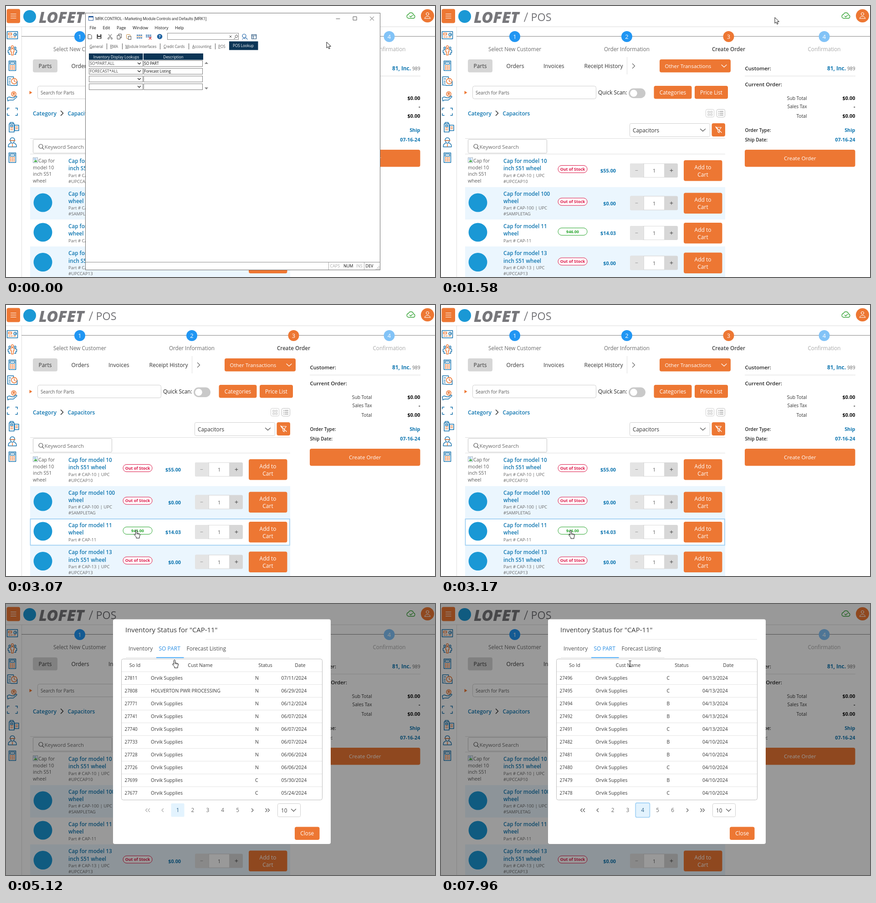
Recreate the animation shown at these times as an HTML page. Size 942 by 594 pixels, loop 8 s.

```html
<!DOCTYPE html>
<html lang="en">
<head>
<meta charset="utf-8">
<title>POS inventory lookup</title>
<style>
html, body { margin: 0; width: 100%; height: 100%; overflow: hidden; background: #fff; }
svg { display: block; width: 942px; height: 594px; font-family: "Open Sans", "Noto Sans", sans-serif; }
text { white-space: pre; }
.b, .o, .l { fill: none; stroke: #1b75ae; stroke-width: 1.5; stroke-linejoin: round; stroke-linecap: round; }
.o { stroke: #ed7733; }
.l { stroke: #333; stroke-width: 1.2; }
.win { transform-origin: 498px 594px; animation: minimise 8s infinite; }
.mask { animation: mask 8s infinite; }
.modal { transform-origin: 474px 165px; animation: pop 8s infinite; }
.cur { animation: move 8s ease-in-out infinite; }
@keyframes minimise {
  0%, 15.25% { opacity: 1; transform: none; animation-timing-function: ease-in; }
  18%, 100% { opacity: 0; transform: translateY(60px) scale(.75); }
}
@keyframes mask { 0%, 41.3% { opacity: 0 } 43.6%, 100% { opacity: 1 } }
@keyframes pop {
  0%, 41.3% { opacity: 0; transform: scale(.7) }
  43.6%, 100% { opacity: 1; transform: none }
}
@keyframes move {
  0%, 1.1% { transform: translate(704px, 79px) }
  5.6%, 20% { transform: translate(733px, 25px); animation-timing-function: ease-in }
  24.3% { transform: translate(654px, 75px); animation-timing-function: ease-out }
  33.6%, 38.4% { transform: translate(286px, 493px) }
  39.5%, 49% { transform: translate(285px, 494px) }
  58%, 62.9% { transform: translate(352px, 102px) }
  64% { transform: translate(370px, 122px) }
  70%, 79% { transform: translate(410px, 454px) }
  80.7%, 82% { transform: translate(442px, 458px) }
  84.4%, 94% { transform: translate(476px, 460px) }
  99.5%, 100% { transform: translate(415px, 131px) }
}
</style>
</head>
<body>
<script>
const ORANGE = '#ed7733', LINK = '#0f76b0', NAVY = '#0c3556', LOGO = '#1a98d5', INK = '#444', DARK = '#383838';
let css = '';
let layers = 0;

const t = (x, y, s, size = 12, fill = INK, weight = 400, anchor = 'start', extra = '') =>
  `<text x="${x}" y="${y}" font-size="${size}" fill="${fill}" font-weight="${weight}" text-anchor="${anchor}" ${extra}>${s}</text>`;
const mid = (x, y, s, size, fill, weight) => t(x, y, s, size, fill, weight, 'middle');
const end = (x, y, s, size, fill, weight) => t(x, y, s, size, fill, weight, 'end');
const r = (x, y, w, h, fill, rx = 0, stroke = 'none', extra = '') =>
  `<rect x="${x}" y="${y}" width="${w}" height="${h}" fill="${fill}" rx="${rx}" stroke="${stroke}" ${extra}/>`;
const box = (x, y, w, h, stroke, rx = 0, fill = '#fff') => r(x + .5, y + .5, w - 1, h - 1, fill, rx, stroke);
const c = (x, y, rad, fill) => `<circle cx="${x}" cy="${y}" r="${rad}" fill="${fill}"/>`;
const p = (d, cls = 'l', extra = '') => `<path d="${d}" class="${cls}" ${extra}/>`;
const h = (x1, x2, y, col = '#dedede') => r(x1, y, x2 - x1, 1, col);
const at = (x, y, s) => `<g transform="translate(${x} ${y})">${s}</g>`;
const white = 'style="stroke:#fff"';

// Shows its content only within the given [start, stop] spans in ms.
function during(spans, content) {
  const name = 'on' + layers++;
  let steps = '0%{opacity:0}';
  for (const [a, b] of spans) steps += `${a / 80}%{opacity:1}` + (b < 8000 ? `${b / 80}%{opacity:0}` : '');
  css += `@keyframes ${name}{${steps}}`;
  return `<g style="animation:${name} 8s step-end infinite">${content}</g>`;
}

const button = (x, y, w, ht, label, size = 11.8) =>
  r(x, y, w, ht, ORANGE, 4) + mid(x + w / 2, y + ht / 2 + 4.5, label, size, '#fff');

// --- Page ---
function header() {
  let s = h(0, 942, 45, '#dcdcdc') + r(34, 46, 1, 548, '#dedede');
  s += r(1.5, 6.5, 29.5, 31, ORANGE, 4) + p('M10.5 17.5h11.5M10.5 22h11.5M10.5 26.5h11.5', 'l', white);
  s += c(52, 23, 14, LOGO);
  s += t(72, 36.5, 'LOFET', 34, '#77777b', 800, 'start', 'font-style="italic"');
  s += p('M183 34L190 15', 'l', 'style="stroke:#77777b;stroke-width:1.8"') + t(197.5, 32.5, 'POS', 23.3, '#707074');
  s += p('M884 27h10a3.8 3.8 0 0 0 .8-7.5 5.7 5.7 0 0 0-11-1 4.3 4.3 0 0 0 .2 8.5zM886.5 22l2.2 2.2 4-4', 'l', 'style="stroke:#3aa53a;stroke-width:1.4"');
  s += c(925.5, 21.5, 14.5, ORANGE) + p('M925.5 14.5a3 3 0 1 0 .01 0zM919.5 27.5c0-6 12-6 12 0z', 'l', white);
  return s;
}

function sidebar() {
  const calc = p('M-7.5-10.5h15v21h-15zM-5-8h10v4.5h-10z', 'b') +
    p('M-5 0h10M-5 3.5h10M-5 7h10', 'o', 'stroke-dasharray="2.4 1.4" style="stroke-width:2.4;stroke-linecap:butt"');
  const person = 'M0-10.5a2.5 2.5 0 1 0 .01 0zM-3.5 0v-2.5q3.5-3 7 0V3h-1.5v7h-4V3h-1.5z';
  const icons = [
    p('M-11.5-8h23v16h-23z', 'b') + p('M-8.5-4.5h7v4h-7zM-8 4h3m2 0h3m3 0h4', 'o') + p('M6-4.5a3 3 0 1 0 .01 0zM6-1.5h3', 'b'),
    p('M-6-7.5a2 2 0 1 0 .01 0zM6-7.5a2 2 0 1 0 .01 0zM-9.5-.5v5h2v4h3M9.5-.5v5h-2v4h-3M-9.5-.5q2-2 4-1M9.5-.5q-2-2-4-1', 'b') + p(person, 'o'),
    calc,
    p('M-10.5-9.5h13v4M-10.5-9.5v18h7M-7.5-5h4M-7.5 0h3M-7.5 4h3', 'b') + p('M4-6a6 6 0 1 0 .01 0zM4-3.5v3.5l2.5 1.5', 'o') + p('M-3 9.5h13.5v-9', 'b'),
    p('M-11 3l4-2 6 2h4l5-4q3 1 1 3L2 8h-8l-4 2z', 'b') + p('M3-10.5a5 5 0 1 0 .01 0zM5-7.5q-4-1-4 1l4 1q0 2-4 1', 'o'),
    p('M-11-4v-4h4M7-8h4v4M11 4v4h-4M-7 8h-4v-4', 'b'),
    at(2, 0, p('M-9-7h11v18h-11zM-7-7v-3h7v3M-6-4h5v3h-5zM3-4h9v12h-9z', 'b') + p('M-6 2h5M-6 6h5M5.5 0h4M5.5 3.5h4', 'o')),
    p('M-5-4q0-6 5-6t5 6zM-4-4q0 6 4 6t4-6M-9 10q0-7 5-8M9 10q0-7-5-8M-9 10h18', 'b') + p('M-6-4h12M0 4v5', 'o'),
    calc
  ];
  return icons.map((s, i) => at(14, 64 + i * 33.55, s)).join('');
}

function steps() {
  const list = [[162, 'Select New Customer', '#2196f3', '#6a6a6a'], [408, 'Order Information', '#2196f3', '#6a6a6a'],
    [631.5, 'Create Order', ORANGE, INK], [841.5, 'Confirmation', '#82c3f7', '#a8a8a8']];
  return h(34, 942, 66, '#858585') + list.map(([x, s, dot, ink], i) =>
    c(x, 67, 12, dot) + mid(x, 72, i + 1, 13, '#fff') + mid(x, 98.5, s, 11.7, ink, i == 2 ? 600 : 400)).join('');
}

function toolbar() {
  let s = r(59, 117, 54, 28.5, '#d6d6d6', 4) + mid(86, 136, 'Parts', 12, '#333', 500);
  [[143.5, 'Orders'], [225, 'Invoices'], [314.5, 'Receipt History']].forEach(([x, l]) => s += t(x, 136, l, 12.1, '#333', 500));
  s += r(408, 112, 1, 38, '#dedede') + p('M420.5 126.5l5 5-5 5', 'l', 'style="stroke:#666"');
  s += r(480, 117, 156, 28.5, ORANGE, 4) + t(491.5, 136, 'Other Transactions', 11.5, '#fff') + p('M616 129l5.5 5 5.5-5', 'l', white);
  s += `<path d="M51.5 186l6 3.7-6 3.7z" fill="${ORANGE}"/>`;
  s += box(69, 175, 272, 29, '#cfcfcf', 4) + t(76, 194, 'Search for Parts', 10, '#5a5a5a');
  s += t(345, 194, 'Quick Scan:', 11.9, '#222') + r(412, 180.5, 37, 21.5, '#c9c9c9', 10.7) + c(423, 191.2, 7.8, '#fff');
  s += button(467.5, 175, 83, 28.5, 'Categories') + button(557, 175, 73, 28.5, 'Price List');
  s += t(59, 240, 'Category', 12, LINK, 600) + p('M120.5 230l5 5-5 5', 'l', 'style="stroke-width:1.6"') + t(135.5, 240, 'Capacitors', 11.7, LINK, 600);
  s += box(581, 226, 19, 18, '#cfcfcf', 3) + p('M586 230.5h3.5v3.5h-3.5zM592 230.5h3.5v3.5h-3.5zM586 236.5h3.5v3.5h-3.5zM592 236.5h3.5v3.5h-3.5z', 'l', 'style="stroke:#c4c4c4"');
  s += box(605, 226, 19, 18, '#bdbdbd', 3) + p('M609.5 231h1m2 0h7M609.5 235h1m2 0h7M609.5 239h1m2 0h7', 'l', 'style="stroke:#666"');
  s += box(414, 257, 177, 30, '#cfcfcf', 3) + t(421, 276.5, 'Capacitors', 11.8, '#333') + p('M569.5 269.5l5.5 5 5.5-5', 'l', 'style="stroke:#555"');
  s += r(594.5, 257, 29.5, 29, ORANGE, 4) + p('M603.5 266h12l-4.5 6v6l-3-2v-4zM603 264.5l13 13', 'l', white);
  s += h(53, 624, 290) + box(59, 292, 174, 31, '#c4c4c4', 2);
  s += p('M76.5 303a4.5 4.5 0 1 0 .01 0zM80 311l3.3 3.3', 'l', 'style="stroke:#555"') + t(84.5, 312.5, 'Keyword Search', 11.6, '#6a6a6a') + h(53, 624, 324);
  return s;
}

// y: title baseline, by: badge top, top and ht: row band
function product({ y, by, top, ht, title, part, stock, price, tint }) {
  const col = stock ? '#27a52c' : '#dc1546';
  let s = tint ? r(53, top, 571, ht, '#ebf6fe') : '';
  title.forEach((l, i) => s += t(137, y + i * 16.3, l, 11.65, LINK, 600));
  part.forEach((l, i) => s += t(137, y + 30.5 + i * 13, l, 9.6, '#666'));
  s += box(256.5, by, 65, 17, col, 8) + mid(289, by + 11.8, stock || 'Out of Stock', 8.9, col, 700);
  s += end(384, by + 16, price, 10.8, LINK, 700);
  s += r(415, by - 4, 105, 31, '#d7d7d7', 3) + r(415, by - 4, 30, 31, '#e4e4e4', 3) + box(445, by - 4, 46, 31, '#dadada');
  s += p(`M427 ${by + 11.5}h5`, 'l', 'style="stroke:#999;stroke-width:1"') + mid(468, by + 16, '1', 10, INK);
  s += p(`M503 ${by + 11.5}h6M506 ${by + 8.5}v6`, 'l', 'style="stroke:#444;stroke-width:1"');
  s += r(533, by - 11, 84.5, 45.5, ORANGE, 4) + mid(575, by + 8.5, 'Add to', 12, '#fff') + mid(575, by + 24.5, 'Cart', 12, '#fff');
  return s;
}

function products() {
  const rows = [
    { y: 344, by: 349, top: 325, ht: 72, title: ['Cap for model 10', 'inch S51 wheel'], part: ['Part # CAP-10 | UPC', '#UPCCAP10'], price: '$55.00' },
    { y: 415.5, by: 420.5, top: 397, ht: 71, title: ['Cap for model 100', 'wheel'], part: ['Part # CAP-100 | UPC', '#SAMPLETAG'], price: '$0.00', tint: true },
    { y: 487, by: 486, top: 468, ht: 59, title: ['Cap for model 11', 'wheel'], part: ['Part # CAP-11'], stock: '946.00', price: '$14.03' },
    { y: 546.3, by: 551.5, top: 527, ht: 67, title: ['Cap for model 13', 'inch S51 wheel'], part: ['Part # CAP-13 | UPC', '#UPCCAP13'], price: '$0.00', tint: true }
  ];
  let s = rows.map(product).join('');
  [431, 496, 561.5].forEach(y => s += c(81, y, 20.5, LOGO));
  ['model 10', 'inch S51', 'wheel'].forEach((l, i) => s += t(59, 357.5 + i * 14.7, l, 10.6, '#5a5a5a'));
  s += t(71, 343, 'Cap for', 10.6, '#5a5a5a') + box(59, 332, 11, 12, '#9ab') +
    '<path d="M61 342l3-5 2 2 2-1v4z" fill="#4caf50"/><path d="M61 334h5l2 3h-7z" fill="#a9cdf0"/>';
  return s + during([[3070, 4460]], r(53.5, 469, 569.5, 57.5, 'none', 0, '#9fd0f3', 'stroke-width="1.8"'));
}

function summary() {
  const X = 667.5, R = 909.5;
  let s = t(X, 141, 'Customer:', 11.5, '#222', 600) + end(889, 141, '81, Inc.', 11.8, LINK, 700) + end(R, 141, '989', 10.2, '#666');
  s += h(667, 910, 153) + t(X, 175.5, 'Current Order:', 11.5, '#222', 600);
  [['Sub Total', '$0.00', 206], ['Sales Tax', '-', 224], ['Total', '$0.00', 245]].forEach(([a, b, y]) =>
    s += end(803.5, y, a, 10.2, '#333') + end(R, y, b, 10.9, '#111', 700));
  [['Order Type:', 'Ship', 275.5], ['Ship Date:', '07-16-24', 296.5]].forEach(([a, b, y]) =>
    s += t(X, y, a, 10.1, '#222', 600) + end(R, y, b, 10.9, LINK, 700));
  return s + button(667, 315, 242.5, 37.5, 'Create Order', 11.65);
}

// --- Desktop window ---
function win() {
  let s = box(174, 15, 648, 564, '#6c6c6c');
  s += during([[270, 1300]], r(706, 16, 45, 22, '#e5e5e5'));
  s += box(181, 22, 11, 10, '#2a5d9c') + r(181, 22, 11, 3, '#2a5d9c');
  s += t(196, 30.5, 'MRK.CONTROL - Marketing Module Controls and Defaults [MRK1]', 9, INK, 400, 'start',
    'font-family="Roboto, sans-serif" letter-spacing="-.29"');
  s += p('M725 28h8M762.5 23.5h7.5v7.5h-7.5zM799.5 23.5l8 8M807.5 23.5l-8 8', 'l', 'style="stroke:#555;stroke-width:1"');
  [[183.5, 'File'], [212.5, 'Edit'], [243, 'Page'], [278, 'Window'], [326.5, 'History'], [371, 'Help']].forEach(([x, l]) => s += t(x, 51, l, 9, '#111'));
  const k = 'style="stroke:#444;stroke-width:1"';
  s += p('M180.5 62.5h5l2.5 2.5v7h-7.5zM244.5 64.5h6v8h-6zM247 64v-2.5h6.5v8h-2.5M225.5 62l5 8M231.5 62l-5 8M225 69.5a1.7 1.7 0 1 0 .01 0zM232 69.5a1.7 1.7 0 1 0 .01 0z', 'l', k);
  s += r(199.5, 62, 10, 10, '#444', 1) + r(202, 62, 5, 3.5, '#fff') + r(201.5, 68, 6, 3, '#fff');
  s += box(264, 62, 9, 10, '#c48a3a', 1) + box(268, 66, 7, 8, '#555');
  const bars = (x, y, col) => p(`M${x} ${y}h12`, 'l', `stroke-dasharray="3.4 .9" style="stroke-linecap:butt;stroke:${col};stroke-width:2"`);
  s += bars(287, 64, '#2f6fae') + p('M287 67h12', 'l', `style="stroke:${ORANGE}"`) + bars(287, 70, '#2f6fae');
  s += bars(307, 64, '#2f6fae') + bars(307, 67.5, '#2f6fae') + p('M314 68l5 5M319 68l-5 5', 'l', 'style="stroke:#d33"');
  s += c(337.5, 67, 5.8, '#1f62a0') + mid(337.5, 70.3, '?', 9, '#fff', 700);
  s += box(354, 59, 157, 15, '#8b8b8b') + p('M491 65l4 4M495 65l-4 4M506 63.5a2.8 2.8 0 1 0 .01 0zM504 69l-3 3', 'l', k);
  s += p('M523 61.5a4 4 0 1 0 .01 0zM526 69l4 4M519 73q3-4 6-1', 'l', 'style="stroke:#2f6fae"') + p('M539.5 62.5h10v9.5h-10zM539.5 65h10M543 65v7', 'l', 'style="stroke:#1f4e79"');
  [[183.5, 'General'], [228.5, 'RMA'], [262, 'Module Interfaces'], [346, 'Credit Cards'], [409, 'Accounting'], [466, 'POS']].forEach(([x, l], i) => {
    s += t(x, 91.5, `<tspan text-decoration="underline">${l[0]}</tspan>${l.slice(1)}`, 8.1, '#555');
    if (i) s += r([221, 255, 338, 401, 459][i - 1], 82, 1, 13, '#555');
  });
  s += r(490, 77.5, 63.5, 19, NAVY) + mid(521, 90, 'POS Lookup', 8.1, '#fff', 500);
  s += r(182, 104, 118.5, 14, NAVY) + r(302, 104, 131, 14, NAVY) + mid(242, 114.5, 'Inventory Display Lookups', 8.2, '#fff', 500) + mid(367.5, 114.5, 'Description', 8.3, '#fff', 500);
  [['SO*PART.ALL', 'SO PART'], ['FORECAST*ALL', 'Forecast Listing'], ['', ''], ['', '']].forEach(([a, b], i) => {
    const y = 119 + i * 17;
    s += box(182, y, 119, 14, '#7c7c7c') + box(302, y, 130, 14, '#7c7c7c') + p(`M289.5 ${y + 5.5}l3 3 3-3`, 'l', 'style="stroke:#222"');
    s += t(184, y + 10.3, a, 8.85, INK) + t(303.5, y + 10.3, b, 8.1, '#000', 500);
  });
  s += '<path d="M436 127l4-4.5 4 4.5zM436 178.5l4 4.5 4-4.5z" fill="#888"/>';
  s += h(174, 822, 561, '#8c8c8c') + r(708, 562, 1, 16, '#aaa') + r(786, 562, 1, 16, '#aaa');
  [[711.5, 'CAPS', '#aaa'], [741, 'NUM', '#111'], [768.5, 'INS', '#aaa'], [789.5, 'DEV', '#111']].forEach(([x, l, f]) => s += t(x, 573, l, 9, f));
  for (let i = 0; i < 3; i++) for (let j = 0; j <= i; j++) s += r(818 - j * 3, 570 + i * 3, 1.5, 1.5, '#999');
  return `<g class="win">${s}</g>`;
}

// --- Dialog ---
function shell(height, tab) {
  const labels = [[269, 'Inventory'], [335.5, 'SO PART'], [396.5, 'Forecast Listing']];
  let s = r(235, 33.5, 478, height, '#fff', 4) + t(262, 62, 'Inventory Status for "CAP-11"', 14.9, DARK, 500);
  s += h(438, 694, 77, '#e6e6e6') + h(263, 491, 117, '#dcdcdc') + (tab ? r(330, 116.7, 60.5, 1.6, '#2196f3') : r(263, 116.7, 67, 1.6, '#2196f3'));
  labels.forEach(([x, l], i) => s += t(x, 101.8, l, 12, i == tab ? '#2b8fe4' : '#505050', 500));
  return s + button(634, height - 4, 54.5, 28.5, 'Close');
}

function inventory() {
  const cols = [344, 396, 460, 519, 581.5, 638.5, 688];
  const heads = ['Group', 'Hand', 'Commited', 'Allocated', 'Shortages', 'Available', 'Order'];
  const rows = ['STOCK - 1009.00 - - - - 0.00', 'RI - 1081.00 - - - - -', 'WATER - 290.00 - - - - -', 'FG - -412.00 1022.00 - - - -'];
  let s = shell(263.5, 0) + box(253, 120, 442, 125, '#bdbdbd', 4) + t(264, 145.5, 'Invloc', 10.7, DARK, 500);
  heads.forEach((l, i) => {
    const two = i == 1 || i == 6;
    s += end(cols[i], two ? 153 : 145.5, l, 10.6, DARK, 500) + (two ? end(cols[i], 138.5, 'On', 10.6, DARK, 500) : '');
  });
  rows.forEach((row, j) => {
    const y = 177.5 + j * 20.3;
    s += h(254, 694, Math.round(y - 15), '#e4e4e4');
    row.split(' ').forEach((v, i) => s += i ? end(cols[i - 1] + (i < 3 ? 2.5 : 0), y, v, 10, INK) : t(261, y, v, 10.3, INK));
  });
  return s;
}

// Each order: last digits of the id, status letter, month and day.
const PAGES = [
  '811N0711 808N0629 771N0612 741N0607 740N0607 733N0607 728N0606 726N0606 699C0530 677C0524',
  '676C0524 675C0524 674B0524 673C0524 654C0518 644C0517 636C0509 635C0509 634B0509 633B0509',
  '632C0509 621C0508 615B0506 604C0502 588C0430 571B0425 552C0422 530C0418 514B0416 498C0413',
  '496C0413 495C0413 494B0413 492B0413 491C0413 482B0410 481B0410 480C0410 479B0410 478C0410'
];

function orders(n) {
  const [h1, h2, h3, h4, name, stat, date] = n ? n == 3 ? [293.5, 411, 528.5, 631, 339.5, 495.5, 574] : [293, 410, 526.5, 629.5, 339, 494, 571.5]
    : [283, 426.5, 569.5, 646, 318, 547, 604.5];
  let s = box(253, 120, 442, 310, '#bdbdbd', 4);
  [[h1, 'So Id'], [h2, 'Cust Name'], [h3, 'Status'], [h4, 'Date']].forEach(([x, l]) => s += mid(x, 138.3, l, 10.6, DARK, 500));
  PAGES[n].split(' ').forEach((row, i) => {
    const y = 166.3 + i * 28, cell = (x, v, size = 10.5) => t(x, y, v, size, DARK, 500);
    s += h(254, 694, 148 + i * 28, '#e4e4e4') + cell(260.5, '27' + row.slice(0, 3), 9.9);
    s += cell(name, n || i != 1 ? 'Orvik Supplies' : 'HOLVERTON PWR PROCESSING');
    s += cell(stat, row[3]) + cell(date, `${row.slice(4, 6)}/${row.slice(6)}/2024`);
  });
  const first = n == 3 ? 2 : 1;
  for (let i = 0; i < 5; i++) {
    const x = 377 + i * 32.9, on = first + i == n + 1;
    s += (on ? r(x - 14.5, 437, 29, 29.5, '#e3f3fe', 2) : '') + mid(x, 456.3, first + i, 11.8, on ? '#31648c' : '#6a6a6a');
  }
  const arrow = (d, dim) => p(d, 'l', `style="stroke:${dim ? '#aaa' : '#555'}"`);
  s += arrow('M310 448.5l-3.5 3.5 3.5 3.5M315.5 448.5l-3.5 3.5 3.5 3.5M345.5 448.5l-3.5 3.5 3.5 3.5', !n);
  s += arrow('M539.5 448.5l3.5 3.5-3.5 3.5M570 448.5l3.5 3.5-3.5 3.5M575 448.5l3.5 3.5-3.5 3.5');
  return s + box(596, 437, 51, 30, '#cfcfcf', 3) + t(604, 456.8, '10', 11.8, INK) + p('M626.5 449.5l5 5 5-5', 'l', 'style="stroke:#555"');
}

const ring = i => r(361.5 + i * 32.9, 436, 31, 31.5, '#e6ebf0', 3, '#a5d4f7', 'stroke-width="2"');

function dialog() {
  const cuts = [4540, 5960, 6600, 7310, 8000];
  const pages = PAGES.map((_, i) => during([[cuts[i], cuts[i + 1]]], orders(i))).join('');
  const rings = during([[5790, 6400]], ring(1)) + during([[6400, 7230], [7310, 8000]], ring(2)) + during([[7230, 7310]], ring(3));
  return r(0, 0, 942, 594, '#000', 0, 'none', 'fill-opacity=".4" class="mask"') +
    `<g class="modal">${during([[0, 4540]], inventory())}${during([[4540, 8000]], shell(492.5, 1))}${rings}${pages}</g>`;
}

function cursor() {
  const look = 'fill="#fff" stroke="#111" stroke-width="1" stroke-linejoin="round"';
  const arrow = `<path d="M0 0v13l3-2.8 2 4.8 2.2-1-2-4.6h4.2z" ${look}/>`;
  const hand = `<path d="M-1.5 1.5q1.5-2.5 3 0V7l6 1.5q1.5.5 1 2.5l-1.5 4v3h-7v-2.5l-4.5-5q0-2 2-1.2l1 1.2z" ${look}/>` +
    '<path d="M1.5 7v3M4 8v2.5M6.3 8.5v2.5" stroke="#111" stroke-width=".8"/>';
  const beam = p('M-2.5-6.5h2l.5.5.5-.5h2M0-6V6M-2.5 6.5h2l.5-.5.5.5h2', 'l', 'style="stroke:#111;stroke-width:1"');
  return '<g class="cur">' + during([[0, 2600], [3200, 4500], [5210, 5500], [7620, 7880]], arrow) +
    during([[2600, 3200], [4500, 5210], [5500, 7620]], hand) + during([[7880, 8000]], beam) + '</g>';
}

const scene = [header, sidebar, steps, toolbar, products, summary, win, dialog, cursor].map(f => f()).join('');
document.body.innerHTML = `<style>${css}</style><svg viewBox="0 0 942 594" width="942" height="594">${scene}</svg>`;
</script>
</body>
</html>
```
